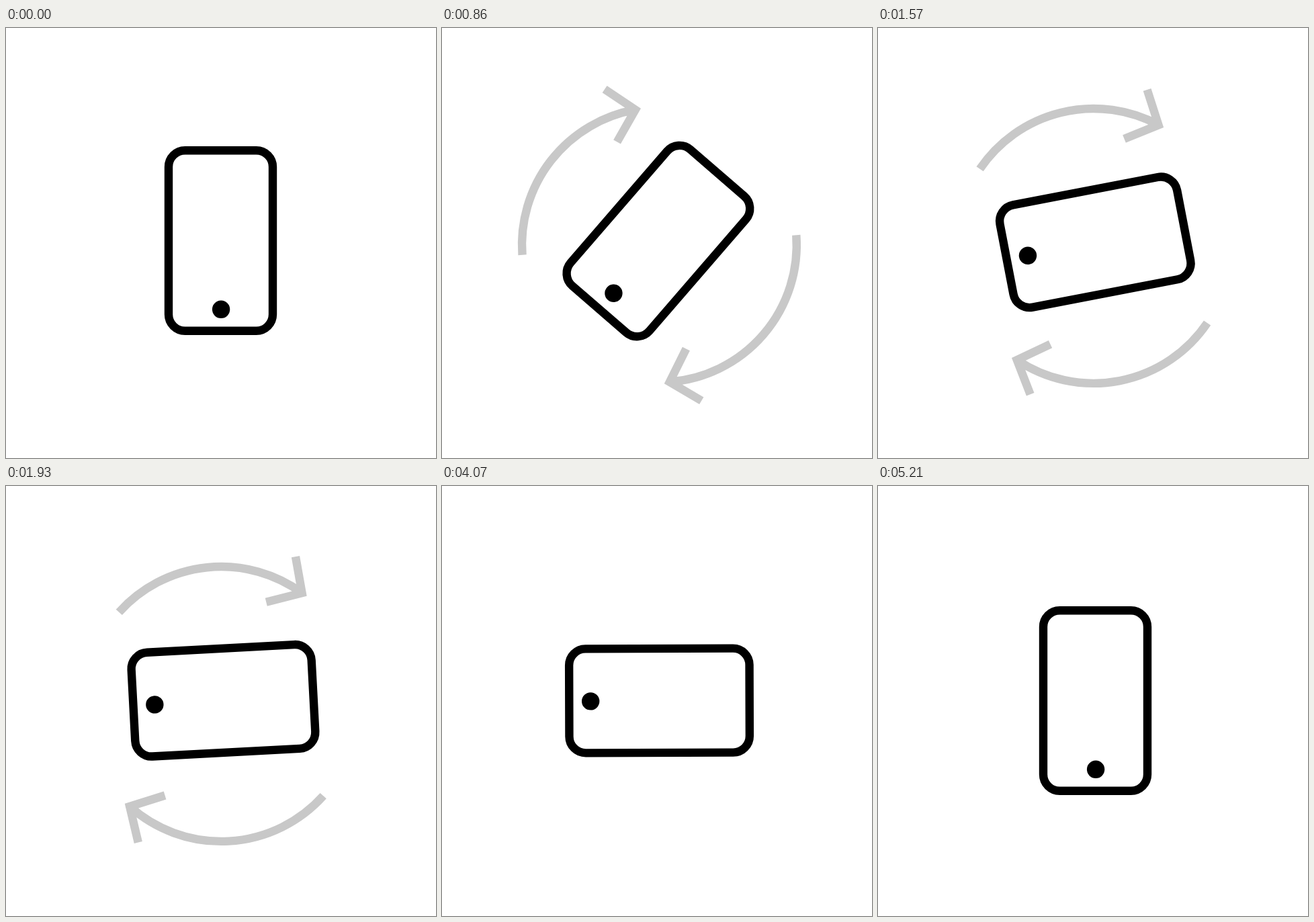
Recreate the animation shown at these times as an HTML page with a canvas. Size 640 px wide and 640 px high, loop 6500 ms.

```html
<!DOCTYPE html>
<html lang="en">
<head>
<meta charset="utf-8">
<title>Rotate device</title>
<style>
html, body { margin: 0; width: 100%; height: 100%; overflow: hidden; background: #fff; }
canvas { display: block; width: 100vmin; height: 100vmin; margin: auto; }
</style>
</head>
<body>
<canvas id="stage" width="640" height="640"></canvas>
<script>
const ctx = document.getElementById('stage').getContext('2d');
const LOOP = 6500, FPS = 14;
const TURN = { start: 0, length: 2385, x1: 0.33, x2: 0.357 };
const BACK = { start: 4000, length: 1200, x1: 0.8, x2: 0.607 };
const PIVOT = 320;
const PHONE = { x: -0.5, y: -3.5 };
const RING = { x: 4.5, y: 0, r: 204.4 };
const ARROWS = [
  { from: 135, to: 219.1, barbs: [173, 78.8] },
  { from: -45, to: 44.8, barbs: [-10.3, -104.4] }
];

const rad = deg => deg * Math.PI / 180;
const clamp = v => Math.min(1, Math.max(0, v));

// Bezier easing with flat ends: control points (x1, 0) and (x2, 1).
function ease(p, x1, x2) {
  if (p <= 0 || p >= 1) return clamp(p);
  let lo = 0, hi = 1;
  for (let i = 0; i < 24; i++) {
    const s = (lo + hi) / 2, q = 1 - s;
    const x = 3 * q * q * s * x1 + 3 * q * s * s * x2 + s * s * s;
    if (x < p) lo = s; else hi = s;
  }
  return lo * lo * (3 - 2 * lo);
}

const progress = (t, m) => ease((t - m.start) / m.length, m.x1, m.x2);

function drawArrow({ from, to, barbs }) {
  const tipX = RING.x + RING.r * Math.cos(rad(to));
  const tipY = RING.y + RING.r * Math.sin(rad(to));
  const [a, b] = barbs.map(d => [tipX + 55 * Math.cos(rad(d)), tipY + 55 * Math.sin(rad(d))]);
  ctx.beginPath();
  ctx.arc(RING.x, RING.y, RING.r, rad(from), rad(to));
  ctx.moveTo(...a);
  ctx.lineTo(tipX, tipY);
  ctx.lineTo(...b);
  ctx.stroke();
}

function drawPhone() {
  ctx.beginPath();
  ctx.roundRect(-77.5, -134.2, 155, 268.4, 24.5);
  ctx.stroke();
  ctx.beginPath();
  ctx.arc(0.6, 102.3, 13.2, 0, Math.PI * 2);
  ctx.fill();
}

function draw(t) {
  const turn = rad(90 * progress(t, TURN));
  const back = rad(-90 * progress(t, BACK));
  const fade = Math.min(clamp(t / 357), clamp((2428 - t) / 357));

  ctx.fillStyle = '#fff';
  ctx.fillRect(0, 0, 640, 640);
  ctx.save();
  ctx.translate(PIVOT, PIVOT);
  ctx.rotate(turn);
  ctx.lineWidth = 12.4;

  if (fade > 0) {
    ctx.globalAlpha = fade;
    ctx.strokeStyle = '#c8c8c8';
    ARROWS.forEach(drawArrow);
    ctx.globalAlpha = 1;
  }

  // The return swing turns around the phone's own centre.
  ctx.translate(PHONE.x, PHONE.y);
  ctx.rotate(back);
  ctx.strokeStyle = ctx.fillStyle = '#000';
  drawPhone();
  ctx.restore();
}

const begin = performance.now();
function tick() {
  const t = (performance.now() - begin) % LOOP;
  draw(Math.floor((t + 5) * FPS / 1000) % (LOOP * FPS / 1000) * 1000 / FPS);
  requestAnimationFrame(tick);
}
tick();
</script>
</body>
</html>
```
